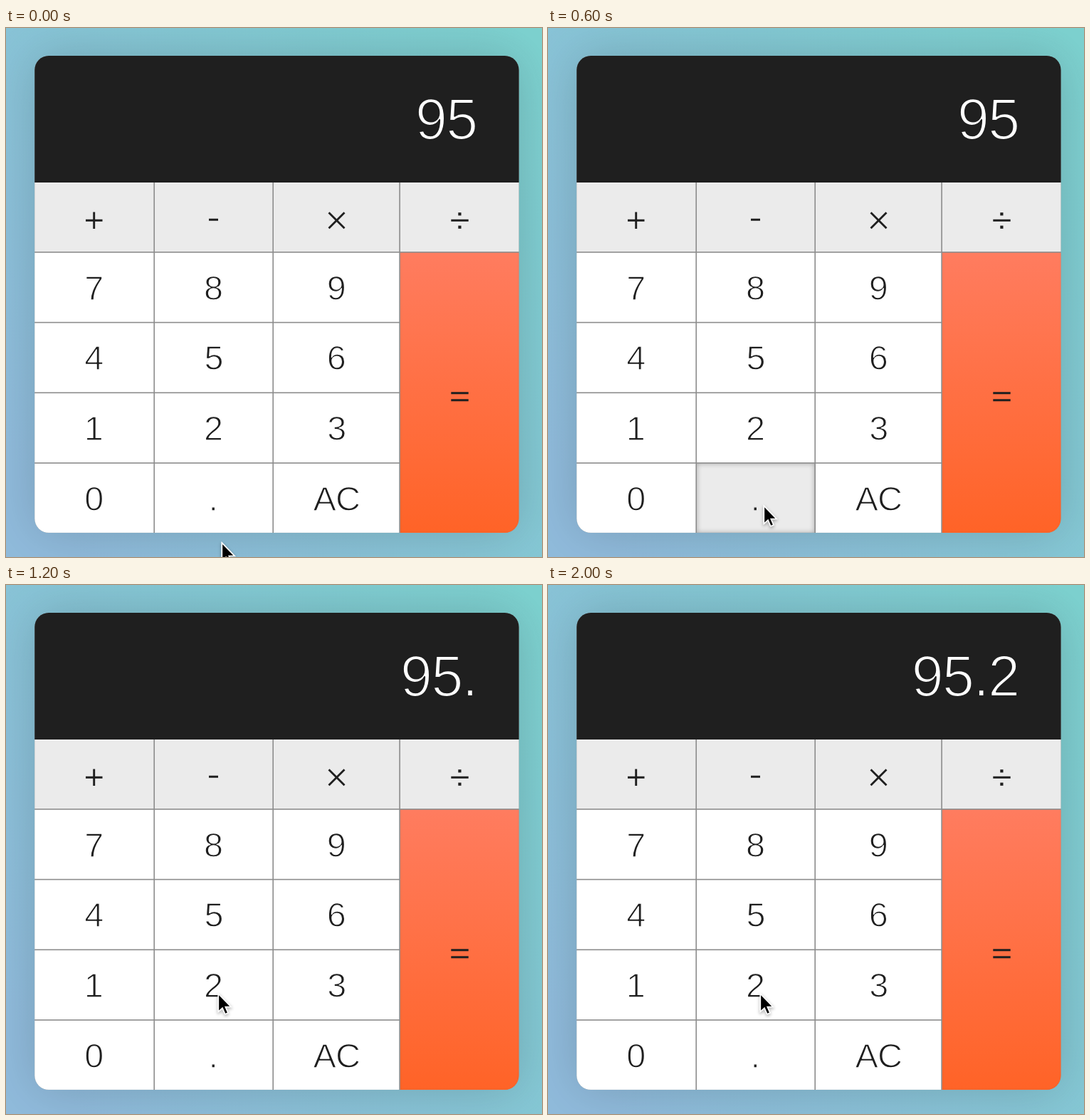
An HTML page with a canvas that plays this animation: 753 px wide and 743 px high, repeating every 2.34 s.

```html
<!DOCTYPE html>
<html lang="en">
<head>
<meta charset="utf-8">
<title>Calculator</title>
<style>
html, body { margin: 0; width: 100%; height: 100%; overflow: hidden; }
canvas { display: block; }
</style>
</head>
<body>
<canvas id="stage" width="753" height="743"></canvas>
<script>
const ctx = document.getElementById('stage').getContext('2d');
const W = 753, H = 743, LOOP = 2340, STEP = 200 / 3;
const INK = '#1f1f1f', LINE = '#8c8c8c', WHITE = '#ffffff', PRESSED = '#ebebeb';
const PANEL = { x: 40.3, y: 39, w: 680.2, h: 670, r: 20 };
const GAP = 1.6, TOP = 217, PITCH = 98.7, KEY_H = PITCH - GAP;
const COLS = [[40, 207.4], [209, 374.4], [376, 552.3], [553.9, 721]];
const CENTERS = [123.7, 291.5, 464.3];
const ROWS = [['7', '8', '9'], ['4', '5', '6'], ['1', '2', '3'], ['0', '.', 'AC']];

function gradient(x0, y0, x1, y1, from, to) {
  const g = ctx.createLinearGradient(x0, y0, x1, y1);
  g.addColorStop(0, from);
  g.addColorStop(1, to);
  return g;
}

function panelPath() {
  ctx.beginPath();
  ctx.roundRect(PANEL.x, PANEL.y, PANEL.w, PANEL.h, PANEL.r);
}

// Light-weight text: trim the glyph edges with the background colour.
function lightText(text, size, x, y, align, color, back) {
  const spacing = -size * 0.0195;
  ctx.font = `${size * 1.035}px "Liberation Sans", Arial, sans-serif`;
  ctx.letterSpacing = `${spacing}px`;
  ctx.lineJoin = 'round';
  ctx.lineWidth = size * 0.028;
  const m = ctx.measureText(text);
  const left = align === 'right'
    ? x - m.width + spacing / 2
    : x - (m.actualBoundingBoxRight - m.actualBoundingBoxLeft) / 2;
  const base = y + size * 0.014;
  ctx.fillStyle = color;
  ctx.fillText(text, left, base);
  ctx.strokeStyle = back;
  ctx.strokeText(text, left, base);
}

function line(x0, y0, x1, y1) {
  ctx.beginPath();
  ctx.moveTo(x0, y0);
  ctx.lineTo(x1, y1);
  ctx.stroke();
}

function drawOperators() {
  ctx.strokeStyle = INK;
  ctx.fillStyle = INK;
  ctx.lineWidth = 2.9;
  line(112, 270.3, 135.5, 270.3);
  line(123.7, 258.5, 123.7, 282);
  line(285, 269.2, 298, 269.2);
  line(453.5, 259.3, 475.5, 281.3);
  line(453.5, 281.3, 475.5, 259.3);
  line(625.3, 270.3, 649.7, 270.3);
  ctx.fillRect(635.3, 259.2, 4.2, 4.2);
  ctx.fillRect(635.3, 277.6, 4.2, 4.2);
  line(625.3, 512.7, 649.7, 512.7);
  line(625.3, 522.7, 649.7, 522.7);
}

function drawKey(label, col, row, pressed) {
  const [x0, x1] = COLS[col], y = TOP + PITCH * row, w = x1 - x0;
  const back = pressed ? PRESSED : WHITE;
  ctx.fillStyle = back;
  ctx.fillRect(x0, y, w, KEY_H);
  if (pressed) {
    ctx.save();
    ctx.beginPath();
    ctx.rect(x0, y, w, KEY_H);
    ctx.clip();
    ctx.shadowColor = 'rgba(0,0,0,0.3)';
    ctx.shadowBlur = 7;
    ctx.strokeStyle = LINE;
    ctx.lineWidth = 6;
    ctx.strokeRect(x0 - 3, y - 3, w + 6, KEY_H + 6);
    ctx.restore();
  }
  lightText(label, 47, CENTERS[col], y + 65.4, 'center', INK, back);
}

function drawCursor(x, y) {
  const pts = [[0, 0], [0, 24.5], [5.6, 19.3], [9.4, 28], [13.2, 26.4], [9.5, 17.8], [17.2, 17.8]];
  ctx.save();
  ctx.translate(x, y);
  ctx.beginPath();
  pts.forEach(([px, py]) => ctx.lineTo(px, py));
  ctx.closePath();
  ctx.lineJoin = 'miter';
  ctx.lineWidth = 2;
  ctx.strokeStyle = WHITE;
  ctx.fillStyle = '#000';
  ctx.shadowColor = 'rgba(0,0,0,0.4)';
  ctx.shadowBlur = 4;
  ctx.shadowOffsetY = 2;
  ctx.stroke();
  ctx.shadowColor = 'transparent';
  ctx.fill();
  ctx.lineWidth = 1.3;
  ctx.stroke();
  ctx.restore();
}

function ease(p) {
  p = Math.min(1, Math.max(0, p));
  return p * p * (3 - 2 * p);
}

// The pointer moves in 15 Hz ticks, rounded to 10 ms.
function tickAt(t) {
  let k = Math.floor((t + 5) / STEP);
  if (t < Math.round(k * STEP / 10) * 10) k--;
  return k;
}

function draw(t) {
  const tick = tickAt(t);
  const pressed = tick === 9 ? '.' : tick === 20 || tick === 21 ? '2' : '';
  const value = tick < 10 ? '95' : tick < 22 ? '95.' : '95.2';

  ctx.fillStyle = gradient(W, 40, 0, 600, '#7dd2d0', '#90bbdc');
  ctx.fillRect(0, 0, W, H);

  ctx.save();
  ctx.shadowColor = 'rgba(0,0,0,0.17)';
  ctx.shadowBlur = 68;
  panelPath();
  ctx.fillStyle = LINE;
  ctx.fill();
  ctx.restore();

  ctx.save();
  panelPath();
  ctx.clip();
  ctx.fillStyle = INK;
  ctx.fillRect(40, 39, 681, TOP - 39);
  lightText(value, 78, 662.5, 154.5, 'right', WHITE, INK);

  ctx.fillStyle = PRESSED;
  COLS.forEach(([x0, x1]) => ctx.fillRect(x0, TOP, x1 - x0, KEY_H));
  ROWS.forEach((row, r) => row.forEach((label, c) => drawKey(label, c, r + 1, label === pressed)));

  ctx.fillStyle = gradient(0, 316, 0, 709, '#ff7c5f', '#ff6327');
  ctx.fillRect(COLS[3][0], TOP + PITCH, 168, 394);
  drawOperators();
  ctx.restore();

  const first = ease(tick / 5), second = ease((tick - 11) / 7);
  drawCursor(303.5 - 5 * second, 723.5 - 52 * first - 97 * second);
}

function frame() {
  draw(performance.now() % LOOP);
  requestAnimationFrame(frame);
}
frame();
</script>
</body>
</html>
```
